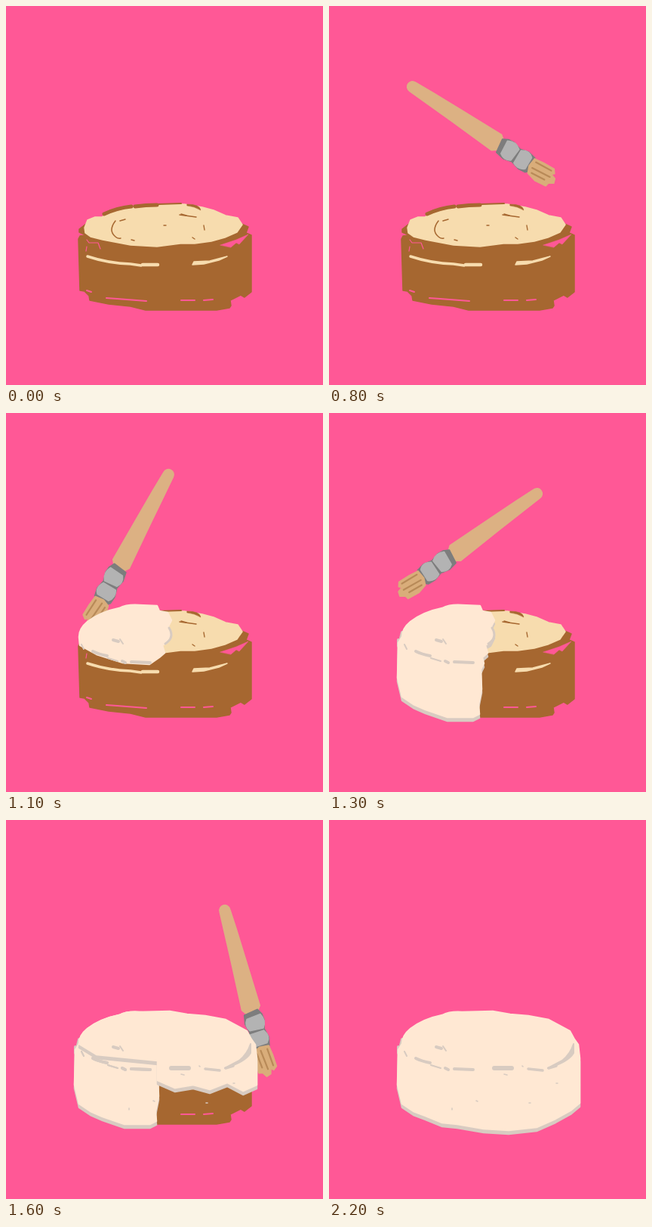
An HTML page for the animation above (2.9 s loop, 420 px wide and 501 px high).

```html
<!DOCTYPE html>
<html lang="en">
<head>
<meta charset="utf-8">
<title>Frosting a cake</title>
<style>
html, body { margin: 0; width: 100%; height: 100%; overflow: hidden; background: #ff5896; }
svg { display: block; width: 100vw; height: 100vh; }
path { stroke-linecap: round; stroke-linejoin: round; }
</style>
</head>
<body>
<svg viewBox="0 0 420 501" preserveAspectRatio="none">
  <g id="cake"></g>
  <g id="brush"></g>
  <g id="frost"></g>
</svg>
<script>
const LOOP = 2900, STEP = 100;
const PINK = '#ff5896', BROWN = '#a66730', CREAM = '#f7dcae', FROST = '#ffe8d3', SHADE = '#d8cbc1', SWIRL = '#cfc5c0',
  GREY = '#b3b3b3', DARK = '#7d7d7d', WOOD = '#dcb183', HAIR = '#d9ad7a', HAIR_DARK = '#b88a58';

const $ = id => document.getElementById(id);
// A thin outline in the same colour rounds the corners like a soft marker.
const fill = (d, color, edge = 1.5) => `<path d="${d}" fill="${color}" stroke="${color}" stroke-width="${edge}"/>`;
const line = (d, color, width) => `<path d="${d}" fill="none" stroke="${color}" stroke-width="${width}"/>`;
const frosting = d => fill(d, FROST, 2.5);
const thick = d => `<g transform="translate(0 5)">${fill(d, SHADE, 2.5)}</g>` + frosting(d);

// Bare sponge
$('cake').innerHTML =
  fill('M96 308L98 304L106 303L97 299L97 295L106 288L124 300L200 314L280 306L312 288L321 292L318 300L325 303V378L316 385L311 382L297 389L298 396L296 399L279 402H185L165 397L136 394L111 389L110 383L104 377L98 376Z', BROWN) +
  fill('M104 293L108 283L118 279L127 279L133 275L168 266L205 263L236 262L260 266L275 270L291 277L307 280L313 289L306 299L290 306L272 311L250 314H231L200 318L165 316L128 309L112 305L105 300Z', CREAM) +
  line('M130 275Q147 267 166 265M171 265Q185 263 200 263', BROWN, 5) +
  line('M202 262L232 261', BROWN, 2) +
  fill('M240 262Q257 262 258 270Q250 265 240 264Z', BROWN, .5) +
  line('M145 284Q135 297 145 305Q148 308 152 307M151 284L158 282M230 276L252 279', BROWN, 1.5) +
  line('M262 290L263 296M247 306L250 308M209 290L212 290M166 309L170 310M232 275L239 277', BROWN, 1.4) +
  line('M108 331Q135 340 165 341L179 343', CREAM, 3.5) +
  line('M181 342H201', CREAM, 4.5) +
  fill('M247 342L249 338L270 337L293 331L282 336L262 341Z', CREAM) +
  line('M107 309L110 313L122 313L125 321M106 324L107 318', PINK, 1.2) +
  line('M107 376L113 378M133 386L147 387L186 390M232 389L250 389M262 389L274 388', PINK, 2) +
  fill('M284 316L305 309L321 302L309 315L305 313L298 319Z', PINK, .5);

// Frosting pieces
const dab = frosting('M160 285L174 275L203 275L219 284L220 300L208 309L185 306L164 302Z') +
  line('M216 284Q224 297 211 305', SWIRL, 4);

const dabs = frosting('M96 290L100 280L112 278L124 279L131 284L139 278L151 277L157 273L177 275L194 274L205 278L216 284L219 299L211 306L202 310L202 323L193 331L178 333L162 334L142 330L132 318L134 311L113 310L99 303Z') +
  line('M97 298Q106 311 129 311M139 290Q141 299 150 302M216 284Q224 297 211 305M133 318Q140 332 165 333', SWIRL, 4);

const leftTop = 'M97 296Q97 285 108 276Q125 263 150 258Q160 253 176 254L200 255L203 262L214 264L219 274L215 282L219 293L214 303L207 307L210 317L203 323';
const topShade = line('M142 300L149 302M115 315Q123 319 134 321M154 328L158 330M166 329L191 330', SHADE, 4) +
  line('M100 306L103 312M135 324L148 328M151 299L155 305', SHADE, 2);
const leftEdge = line('M92 300L92 308M97 290L95 298', SHADE, 4);
const dimple = line('M216 284Q224 297 211 305', SHADE, 3);

const half = leftEdge +
  thick(leftTop + 'L205 331L201 339L202 365L198 385L199 398L191 402H157L128 392L112 385L97 375L91 350L92 304Z') +
  topShade + dimple;

const leftCap = frosting(leftTop + 'L190 332L155 330L120 319L98 307Z') + topShade + dimple;
const leftUpper = leftEdge +
  thick(leftTop + 'L205 331L201 346L170 352L143 345L119 357L92 350L91 330L92 304Z') + topShade + dimple;

const firstSwirl = frosting('M200 256L215 256L219 264L235 270L250 281L250 298L238 307L220 309L207 312Z') +
  line('M204 293Q211 312 238 306', SWIRL, 5);

const swirls = frosting('M200 256L215 255L219 262L235 266L248 271L262 271L274 273L286 277L307 274L314 279L314 287L306 292L287 294L275 296L259 297L246 303L236 308L222 309L208 309L207 316Z') +
  line('M204 294Q211 312 238 306M253 289Q261 298 275 291M284 289Q292 298 307 290', SWIRL, 5);

const fullTop = 'M97 296Q97 285 108 276Q125 263 150 258Q160 253 176 254L217 253L240 257L264 259L291 264L306 272L319 279L325 290L330 297L332 315';
const rimShade = topShade +
  fill('M324 296V308Q317 320 290 328L309 318Q320 309 324 296Z', SHADE, 2) +
  line('M264 329L283 331M291 328L301 325', SHADE, 3.5) + line('M219 328H242', SHADE, 6) +
  line('M256 325L257 326M232 336L236 337M301 348H303M265 374H267M195 371L197 372M163 381L163 383', SHADE, 1.6);

const rightUpper = half + thick(fullTop + 'V350L314 358L293 347L270 356L248 350L224 354L201 344V318L120 310Z') + rimShade;

const full = leftEdge +
  thick(fullTop + 'V374L320 384L300 395L275 406L238 410L205 408L170 402L150 400L128 391L112 385L97 375L91 350L92 304Z') + rimShade;

// Brush lies along the x axis, starting at the end of its handle
const handle = len => {
  const w = 8 + len / 32;
  return fill(`M0 -7L${len * .2} -8.5L${len * .5} -10L${len - 5} ${-w}L${len} ${4 - w}L${len + 2} ${w - 5}L${len - 5} ${w}L${len * .5} 9.5L${len * .2} 8L0 7C-10 7 -10 -7 0 -7Z`, WOOD);
};
const ferrule =
  fill('M137 -8L144 -12L152 -13L164 -10L176 -13L187 -11L190 8L186 12L176 13L164 10L152 13L140 11Z', DARK) +
  fill('M144 -10Q154 -16 163 -9L162 9Q154 15 146 9Z', GREY) +
  fill('M166 -9Q176 -16 183 -9L184 8Q176 15 167 10Z', GREY);
const bristles =
  fill('M187 -10L200 -12L216 -13L220 -8L217 -5L224 -3L226 3L220 7L219 12L203 14L190 11L186 2Z', HAIR) +
  line('M191 -7L214 -9M191 2L217 -1M194 8L213 6', HAIR_DARK, 2.2);
const socket = '<ellipse cx="175" cy="0" rx="13" ry="13" fill="#8a8178"/>' +
  '<ellipse cx="175" cy="0" rx="9.5" ry="10.5" fill="#b88a52"/>';
const collar =
  fill('M139 -8L146 -12L164 -11L172 -12L174 12L164 11L148 12L140 9Z', DARK) +
  fill('M144 -9Q153 -14 163 -9L162 9Q154 13 146 9Z', GREY) + fill('M165 -10L174 -12L174 11L166 10Z', GREY);

const whole = handle(138) + ferrule + bristles;
const hollow = handle(138) + collar + socket;

const pose = (x, y, angle, parts = whole, flip = 1) =>
  `<g transform="translate(${x} ${y}) rotate(${angle}) scale(1 ${flip})">${parts}</g>`;
const rest = parts => pose(108, 106, 20, parts);
const leave = parts => pose(183, 95, 40.3, parts);

// [start step, brush, frosting]
const scenes = [
  [0, '', ''],
  [2, rest(handle(50)), ''],
  [3, rest(handle(95)), ''],
  [4, rest(handle(138)), ''],
  [5, rest(handle(138) + ferrule), ''],
  [6, rest(whole), ''],
  [8, pose(111, 107, 33.5), ''],
  [9, pose(115, 75, 72), dab],
  [10, pose(170, 73, 99), dabs],
  [11, pose(215, 82, 118, whole, -1), leftCap],
  [12, pose(200, 148, 130, whole, -1), leftUpper],
  [13, pose(275, 107, 144, whole, -1), half],
  [14, pose(228, 69, 88), half + firstSwirl],
  [15, pose(210, 82, 63.6), half + swirls],
  [16, pose(290, 120, 75), rightUpper],
  [17, leave(whole), full],
  [18, leave(hollow), full],
  [19, leave(handle(138)), full],
  [20, leave(handle(95)), full],
  [21, leave(handle(50)), full],
  [22, '', full]
];

let shown;
function draw(now) {
  const step = Math.floor(now % LOOP / STEP);
  const scene = scenes.findLast(([start]) => start <= step);
  if (scene !== shown) {
    shown = scene;
    $('brush').innerHTML = scene[1];
    $('frost').innerHTML = scene[2];
  }
}
const began = performance.now();
function tick() {
  draw(performance.now() - began);
  requestAnimationFrame(tick);
}
tick();
</script>
</body>
</html>
```
